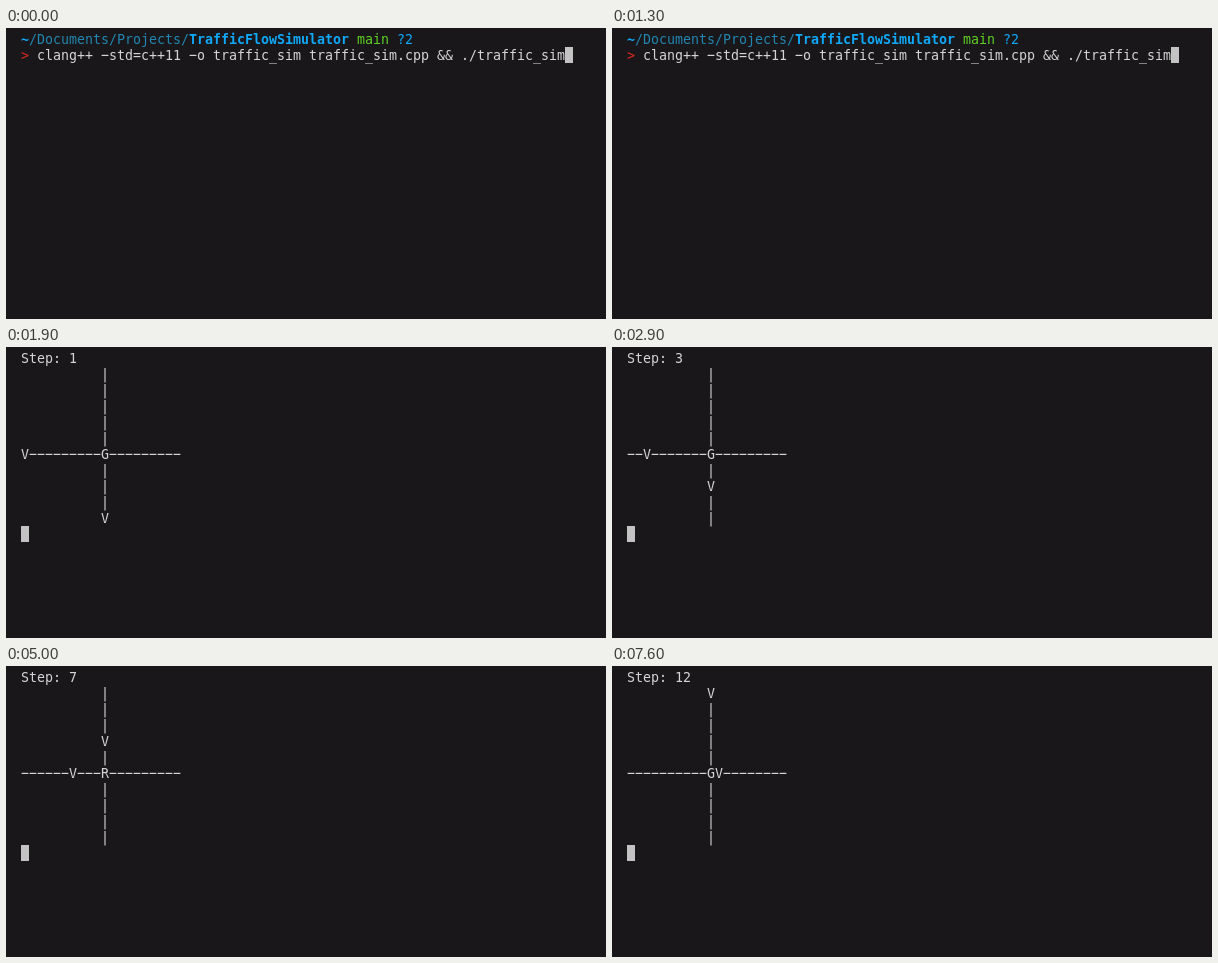
These frames come from a looping animation (600x291 px, 8 s). An HTML page with a canvas:

```html
<!DOCTYPE html>
<html lang="en">
<head>
<meta charset="utf-8">
<title>Terminal: traffic_sim</title>
<style>
  html, body { margin: 0; width: 100%; height: 100%; overflow: hidden; background: #19171a; }
  canvas { display: block; width: 600px; height: 291px; }
</style>
</head>
<body>
<canvas id="term"></canvas>
<script>
const W = 600, H = 291, LOOP = 8000;
const CELL_W = 8, CELL_H = 16, LEFT = 15, TOP = 3, BASE = 13;
const FONT = '13.29px "DejaVu Sans Mono", "Liberation Mono", monospace';
const INK = '#d6d5d6', DIM = '#2286b0', BLUE = '#10a8f8', GREEN = '#5fd024', RED = '#e0291f';

const ENTER_AT = 1400;
const STEP_AT = [1800, 2400, 2900, 3400, 4000, 4500, 5000, 5500, 6000, 6500, 7100, 7600];
const ROAD = 20, CROSS_COL = 10, CROSS_ROW = 6, LAST_ROW = 10, LIGHT_STEPS = 5;
const COMMAND = 'clang++ -std=c++11 -o traffic_sim traffic_sim.cpp && ./traffic_sim';

const canvas = document.getElementById('term');
const ctx = canvas.getContext('2d');
const ratio = window.devicePixelRatio || 1;
canvas.width = W * ratio;
canvas.height = H * ratio;
ctx.scale(ratio, ratio);

// Writes text on the character grid; returns the next free column.
function put(col, row, text, color = INK, bold = false) {
  ctx.font = (bold ? 'bold ' : '') + FONT;
  ctx.fillStyle = color;
  const base = TOP + row * CELL_H + BASE;
  for (const ch of text) {
    const x = LEFT + col * CELL_W;
    if (ch === '-') ctx.fillRect(x + 0.6, base - 5.2, 6.8, 1.2); // wide terminal hyphen
    else ctx.fillText(ch, x, base);
    col++;
  }
  return col;
}

function cursor(col, row) {
  ctx.fillStyle = '#c4c3c4';
  ctx.fillRect(LEFT + col * CELL_W, TOP + row * CELL_H, CELL_W, CELL_H);
}

function drawPrompt(entered) {
  let col = put(0, 0, '~', BLUE, true);
  col = put(col, 0, '/Documents/Projects/', DIM);
  col = put(col, 0, 'TrafficFlowSimulator', BLUE, true);
  col = put(col + 1, 0, 'main', GREEN);
  put(col + 1, 0, '?2', BLUE);
  put(0, 1, '>', RED);
  const end = put(2, 1, COMMAND);
  if (entered) cursor(0, 2);
  else cursor(end, 1);
}

function drawStep(step) {
  const carCol = step - 1;
  const carRow = Math.max(1, LAST_ROW + 1 - step);
  const light = Math.floor((step - 1) / LIGHT_STEPS) % 2 ? 'R' : 'G';

  put(0, 0, 'Step: ' + step);
  for (let row = 1; row <= LAST_ROW; row++) {
    if (row !== CROSS_ROW) put(CROSS_COL, row, row === carRow ? 'V' : '|');
  }
  for (let col = 0; col < ROAD; col++) {
    const crossing = col === CROSS_COL;
    const car = col === carCol || (crossing && carRow === CROSS_ROW);
    put(col, CROSS_ROW, car ? 'V' : crossing ? light : '-');
  }
  cursor(0, LAST_ROW + 1);
}

function draw(t) {
  ctx.fillStyle = '#19171a';
  ctx.fillRect(0, 0, W, H);
  const step = STEP_AT.filter(at => at <= t).length;
  if (step) drawStep(step);
  else drawPrompt(t >= ENTER_AT);
}

const start = performance.now();
function tick() {
  draw((performance.now() - start) % LOOP);
  requestAnimationFrame(tick);
}
tick();
</script>
</body>
</html>
```
